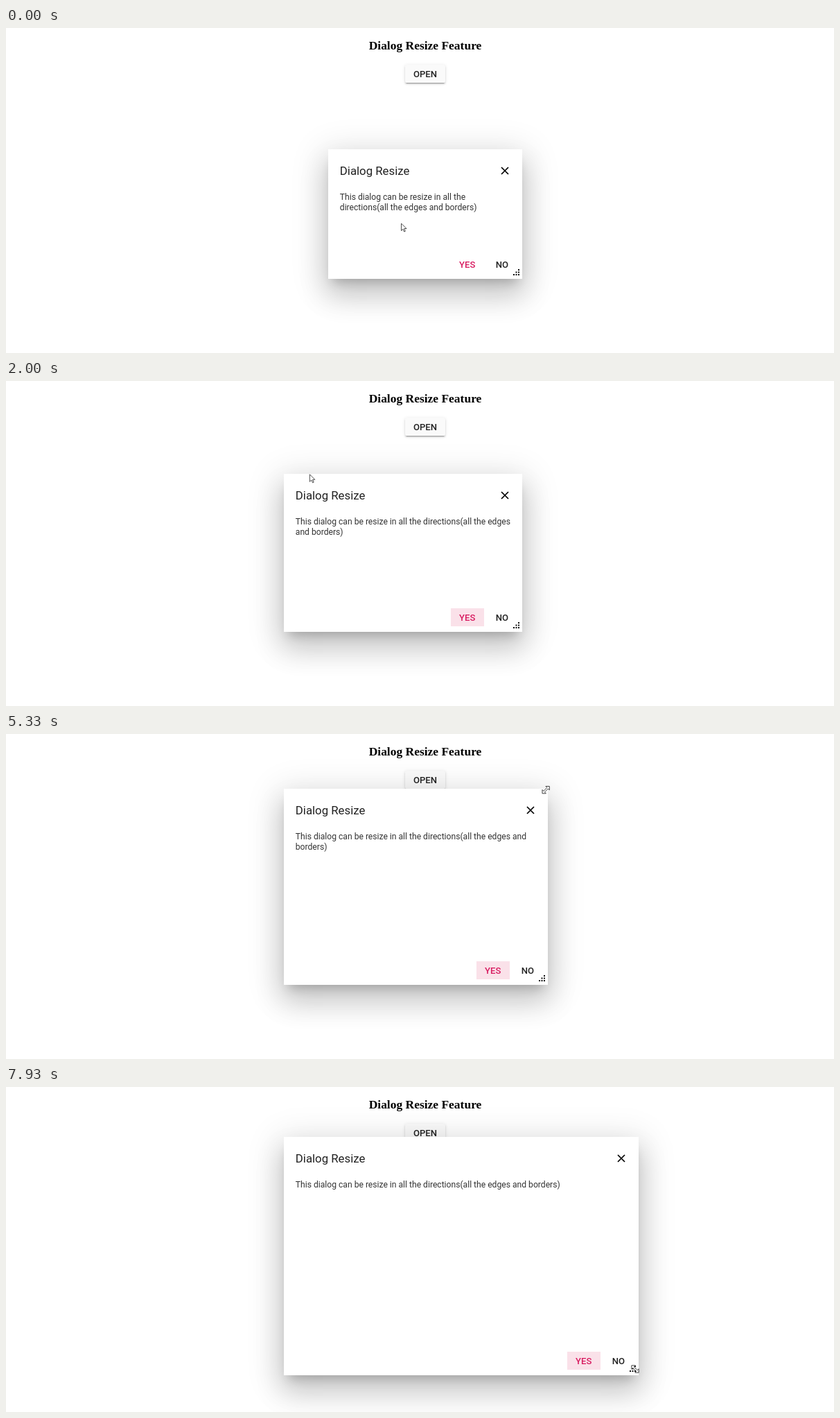
Animation of 1195 by 469 pixels, one loop 8 s. Source, as an HTML page:

```html
<!DOCTYPE html>
<html lang="en">
<head>
<meta charset="utf-8">
<title>Dialog Resize Feature</title>
<style>
  html, body { margin: 0; width: 100%; height: 100%; overflow: hidden; background: #fff; }
  body { position: relative; font-family: Roboto, sans-serif; color: #222; }
  body > *, .dialog > * { position: absolute; white-space: nowrap; }
  h3 {
    left: 505px; top: 15px; width: 200px; margin: 0; text-align: center; color: #000;
    font: bold 17.48px/21px "Liberation Serif", "Times New Roman", serif;
  }
  .button { font-size: 13.08px; font-weight: 500; line-height: 27px; text-align: center; height: 26px; }
  .open {
    left: 576px; top: 53px; width: 58px; line-height: 28px; border-radius: 2px; background: #fafafa;
    box-shadow: 0 3px 1px -2px rgba(0,0,0,.2), 0 2px 2px rgba(0,0,0,.14), 0 1px 5px rgba(0,0,0,.12);
  }
  .dialog {
    background: #fff;
    box-shadow: 0 11px 15px -7px rgba(0,0,0,.2), 0 24px 38px 3px rgba(0,0,0,.14), 0 9px 46px 8px rgba(0,0,0,.12);
  }
  .title { left: 16.8px; top: 21px; font-size: 16.8px; line-height: 20px; }
  .dialog .content {
    left: 16.8px; right: 15px; top: 62px; white-space: normal;
    font-size: 12.14px; line-height: 15px; color: #333;
  }
  .close { right: 19px; top: 25px; }
  .yes { right: 55.5px; bottom: 8px; width: 47.5px; color: #d81b60; }
  .yes.focused { background: #fae1e9; }
  .no { right: 9px; bottom: 8px; width: 40px; }
  .grip { right: 3px; bottom: 4px; }
  svg { overflow: visible; }
  .cursor { left: 0; top: 0; }
  .cursor path { fill: #fff; stroke: #3a3a3a; stroke-width: .9; }
</style>
</head>
<body>
<h3>Dialog Resize Feature</h3>
<div class="button open">OPEN</div>
<div class="dialog">
  <div class="title">Dialog Resize</div>
  <svg class="close" width="12" height="12"><path d="M1 1L11 11M11 1L1 11" stroke="#000" stroke-width="1.7"/></svg>
  <div class="content">This dialog can be resize in all the directions(all the edges and borders)</div>
  <div class="button yes">YES</div>
  <div class="button no">NO</div>
  <svg class="grip" width="10" height="10">
    <path d="M0 7h2v2h-2zM3.5 7h2v2h-2zM7 7h2v2h-2zM3.5 3.5h2v2h-2zM7 3.5h2v2h-2zM7 0h2v2h-2z" fill="#111"/>
  </svg>
</div>
<svg class="cursor" width="1" height="1"><path/></svg>
<script>
const LOOP = 8000, TICKS = 120;

const POINTER = "M.5.5V11L3 8.7L4.7 12.5L6.3 11.8L4.7 8H8Z";
const DOUBLE_ARROW = "M-7.3 0L-3.5-3.8V-1.1H3.5V-3.8L7.3 0L3.5 3.8V1.1H-3.5V3.8Z";
const ANGLES = { ew: 0, ns: 90, nwse: 45, nesw: -45 };

// tick, left, top, right, bottom
const dialogKeys = [
  [0, 465, 175, 745, 362], [15, 465, 175, 745, 362], [20, 429, 153, 745, 362], [26, 401, 134, 745, 362],
  [54, 401, 134, 745, 362], [60, 401, 97, 745, 362],
  [75, 401, 97, 745, 362], [82, 401, 72, 797, 362],
  [99, 401, 72, 797, 362], [105, 401, 72, 867, 362],
  [112, 401, 72, 867, 362], [119, 401, 72, 913, 416]
];

// tick, x, y, shape kept until the next key
const cursorKeys = [
  [0, 570, 281.5, "arrow"], [8, 474, 154, "arrow"], [11, 462.5, 170, "arrow"], [12, 462.5, 170, "arrow"],
  [13, 467, 177, "nwse"], [15, 467, 177, "nwse"], [20, 430.5, 153.5, "nwse"], [26, 403, 135.5, "nwse"],
  [28, 403, 135.5, "nwse"], [29, 420, 135, "arrow"], [36, 545, 130, "arrow"], [40, 545, 130, "arrow"],
  [41, 552, 131, "arrow"], [42, 552, 131, "arrow"], [43, 557, 131, "arrow"], [45, 559, 131, "arrow"],
  [47, 559, 131, "arrow"], [48, 556, 135, "ns"], [50, 556, 135, "ns"], [52, 559, 133.5, "ns"],
  [54, 559, 133.5, "ns"], [60, 559, 97, "ns"], [61, 590, 96, "arrow"], [67, 737, 96, "arrow"],
  [68, 752, 100, "arrow"], [69, 752, 100, "arrow"], [70, 747, 102, "arrow"], [71, 744, 98, "arrow"],
  [72, 742, 98.5, "nesw"], [75, 742, 98.5, "nesw"], [82, 794, 73.5, "nesw"], [83, 797, 98, "arrow"],
  [87, 811, 206, "arrow"], [89, 811, 209, "arrow"], [91, 802, 208, "arrow"], [92, 799, 209, "ew"],
  [94, 796, 209, "ew"], [99, 796, 209, "ew"], [105, 866, 209, "ew"], [106, 868, 240, "arrow"],
  [109, 870, 346.5, "arrow"], [111, 866, 351, "arrow"], [112, 862, 353, "nwse"], [119, 908, 407, "nwse"]
];

const dialog = document.querySelector(".dialog");
const yes = document.querySelector(".yes");
const cursor = document.querySelector(".cursor path");

function sample(keys, tick) {
  const next = keys.findIndex(key => key[0] > tick);
  const from = keys.at(next < 0 ? -1 : next - 1);
  const to = next < 0 ? from : keys[next];
  const part = to === from ? 0 : (tick - from[0]) / (to[0] - from[0]);
  return from.slice(1).map((value, i) =>
    typeof value === "number" ? value + (to[i + 1] - value) * part : value);
}

function draw(tick) {
  const [left, top, right, bottom] = sample(dialogKeys, tick).map(Math.round);
  Object.assign(dialog.style, {
    left: left + "px", top: top + "px", width: right - left + "px", height: bottom - top + "px"
  });
  yes.classList.toggle("focused", tick > 15);

  const [x, y, shape] = sample(cursorKeys, tick);
  cursor.setAttribute("d", shape === "arrow" ? POINTER : DOUBLE_ARROW);
  cursor.setAttribute("transform", `translate(${x} ${y}) rotate(${ANGLES[shape] ?? 0})`);
}

function frame() {
  const time = (performance.now() + 4) % LOOP;
  draw(Math.floor(time * TICKS / LOOP));
  requestAnimationFrame(frame);
}
frame();
</script>
</body>
</html>
```
